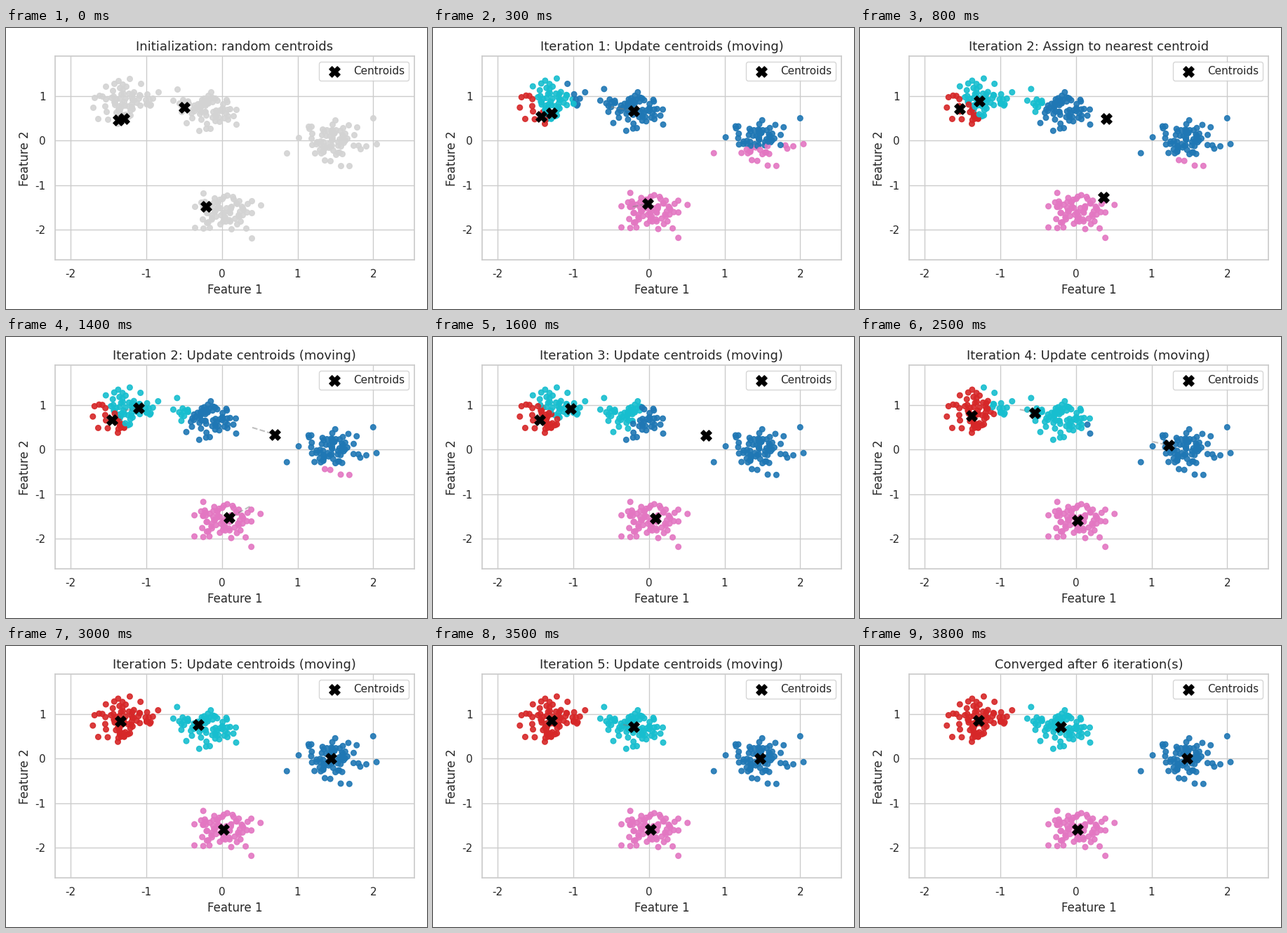
Animation of 600x400 px, one loop 3900 ms. Source, as a matplotlib script:

```python
import numpy as np
import matplotlib.pyplot as plt
from matplotlib.animation import FuncAnimation

INK, GRID = "#262626", "#cccccc"
plt.rcParams.update({
    "font.family": "DejaVu Sans", "font.size": 12,
    "axes.unicode_minus": False, "axes.axisbelow": True, "axes.grid": True,
    "axes.edgecolor": GRID, "axes.linewidth": 1.25, "axes.labelsize": 12,
    "axes.titlesize": 13, "axes.labelcolor": INK, "text.color": INK,
    "grid.color": GRID, "grid.linewidth": 1,
    "xtick.color": INK, "ytick.color": INK,
    "xtick.labelsize": 11, "ytick.labelsize": 11,
    "xtick.major.size": 6, "ytick.major.size": 6,
    "xtick.bottom": False, "ytick.left": False, "legend.fontsize": 11,
})

CLUSTERS, PER_CLUSTER, SPREAD = 4, 75, 1.3
MOVE_STEPS = 6
COLORS = np.array(["#1f77b4", "#d62728", "#e377c2", "#17becf"])


def make_points():
    rng = np.random.RandomState(7)
    centers = rng.uniform(-10, 10, (CLUSTERS, 2))
    pts = np.vstack([rng.normal(c, SPREAD, (PER_CLUSTER, 2)) for c in centers])
    order = np.arange(len(pts))
    rng.shuffle(order)
    pts = pts[order]
    return (pts - pts.mean(axis=0)) / pts.std(axis=0)


def nearest(a, b):
    """Index of the closest row of b for every row of a."""
    return np.linalg.norm(a[:, None] - b[None], axis=2).argmin(axis=1)


def build_scenes(pts, cents):
    """List of (title, labels, trail start, centroids), one per frame."""
    scenes = [("Initialization: random centroids", None, cents, cents)]
    step = 0
    while True:
        step += 1
        labels = nearest(pts, cents)
        new = np.array([pts[labels == k].mean(axis=0) for k in range(CLUSTERS)])
        scenes.append((f"Iteration {step}: Assign to nearest centroid",
                       labels, cents, cents))
        title = f"Iteration {step}: Update centroids (moving)"
        if np.allclose(new, cents):
            scenes.append((title, labels, cents, cents))
            scenes.append((f"Converged after {step} iteration(s)",
                           labels, cents, cents))
            return scenes
        for i in range(1, MOVE_STEPS + 1):
            t = i / MOVE_STEPS
            scenes.append((title, labels, cents, (1 - t) * cents + t * new))
        cents = new


points = make_points()
seeds = np.array([(-0.497, 0.746), (-1.368, 0.462),
                  (-0.213, -1.486), (-1.295, 0.494)])
scenes = build_scenes(points, points[nearest(seeds, points)])

fig, ax = plt.subplots(figsize=(6, 4), dpi=100)
dots = ax.scatter(*points.T, s=30, c="lightgray", alpha=0.9)
trails = [ax.plot([], [], "--", color="gray", lw=1.5, alpha=0.5)[0]
          for _ in range(CLUSTERS)]
marks = ax.scatter(*seeds.T, s=120, c="black", marker="X",
                   label="Centroids", zorder=4)
(x0, y0), (x1, y1) = points.min(axis=0) - 0.5, points.max(axis=0) + 0.5
ax.set(xlim=(x0, x1), ylim=(y0, y1), xlabel="Feature 1", ylabel="Feature 2")
title = ax.set_title(scenes[0][0])
ax.legend(loc="upper right")
fig.tight_layout()


def update(frame):
    text, labels, start, now = scenes[frame]
    title.set_text(text)
    dots.set_color("lightgray" if labels is None else COLORS[labels])
    marks.set_offsets(now)
    for line, a, b in zip(trails, start, now):
        line.set_data([a[0], b[0]], [a[1], b[1]])
    return [title, dots, marks, *trails]


anim = FuncAnimation(fig, update, frames=len(scenes), interval=100, repeat=True)
plt.show()
```
